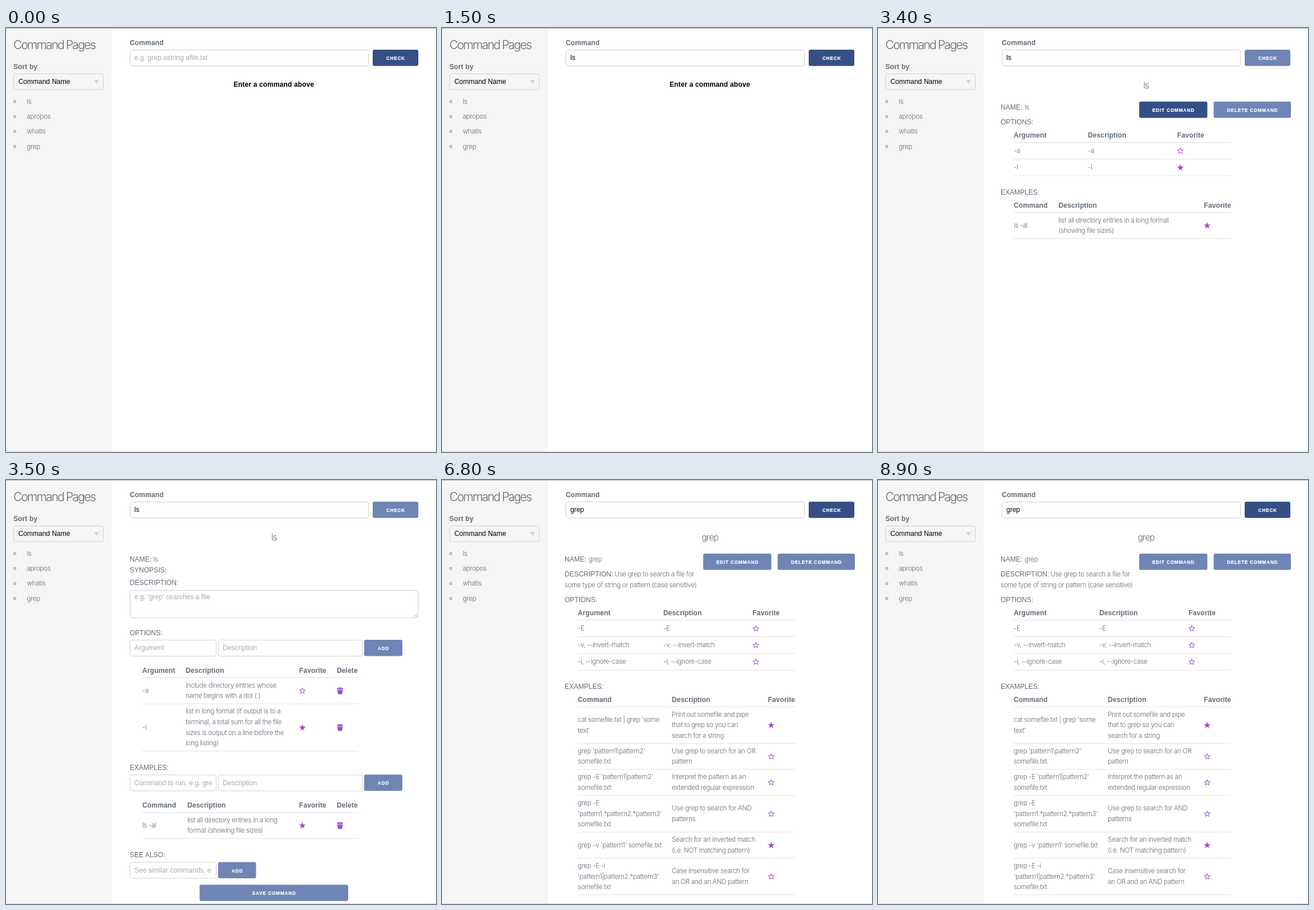
An HTML page for the animation above (9000 ms loop, 754 by 743 pixels).

```html
<!DOCTYPE html>
<html>
<head>
<meta charset="utf-8">
<style>
  html, body { margin: 0; width: 100%; height: 100%; overflow: hidden; background: #fff; }
  svg { display: block; }
  text { font: 12px "Liberation Sans", Arial, sans-serif; fill: #606c76; white-space: pre; }
  .bold { font-weight: 700; letter-spacing: .12px; }
  .light { font: 300 11.6px Inter, sans-serif; letter-spacing: -.34px; }
  .title { font: 300 21px Inter, sans-serif; letter-spacing: -1.85px; }
  .heading { font: 300 15.5px Inter, sans-serif; letter-spacing: -.95px; text-anchor: middle; }
  .hint { fill: #a9a9a9; }
  .black { fill: #000; }
  .label { font-size: 8.25px; font-weight: 700; letter-spacing: .75px; fill: #fff; stroke: #fff; stroke-width: .2px; text-anchor: middle; }
  .box { fill: #fff; stroke: #d1d1d1; }
  .button { fill: #6f85b5; }
  .hover .button { fill: #344f84; }
  .rule { stroke: #e1e1e1; }
  .icon { fill: #9b4dca; }
  .open { fill: none; stroke: #9b4dca; }
  .focus { stroke: #9b4dca; }
</style>
</head>
<body>
<svg id="stage" width="754" height="743" viewBox="0 0 754 743"></svg>
<script>
const LINE = 18.65;
const text = (x, y, str, cls = '') => `<text x="${x}" y="${y}" class="${cls}">${str}</text>`;
const light = (x, y, str) => text(x, y, str, 'light');
const bold = (x, y, str) => text(x, y, str, 'bold');
const group = (id, content) => `<g id="${id}">${content}</g>`;
const rect = (x, y, w, h, cls, id = '') =>
  `<rect id="${id}" x="${x}" y="${y}" width="${w}" height="${h}" rx="3" class="${cls}"/>`;
const field = (x, y, w, hint, h = 28, baseline = 18.3) =>
  rect(x + .5, y + .5, w - 1, h, 'box') + text(x + 8, y + baseline, hint, 'hint');
const button = (id, x, y, w, label) =>
  group(id, rect(x, y, w, 28.5, 'button') + text(x + w / 2 + .4, y + 18, label, 'label'));

function star(x, y, filled, id = '') {
  const radius = filled ? 6.2 : 5.4;
  const points = Array.from({ length: 10 }, (_, i) => {
    const r = i % 2 ? radius * .4 : radius, a = i * Math.PI / 5;
    return `${(x + r * Math.sin(a)).toFixed(2)},${(y + .4 - r * Math.cos(a)).toFixed(2)}`;
  });
  return `<polygon id="${id}" points="${points.join(' ')}" class="${filled ? 'icon' : 'open'}"/>`;
}

const empty = (x, y) => star(x, y, false);
const full = (x, y) => star(x, y, true);
const toggled = (x, y) => star(x, y, false, 'unstarred') + star(x, y, true, 'starred');
const trash = (x, y) => `<g transform="translate(${x} ${y})" class="icon">
  <path d="M-4.8-1.8Q0 .4 4.8-1.8L3.7 5.4Q0 7.2-3.7 5.4Z"/>
  <ellipse cy="-3.7" rx="5.1" ry="2.2"/><path d="M-2.7-3.6H-.7M1-4.2H2.6" stroke="#fff"/></g>`;

// Columns: [x, heading]. Cells: lines of text, or a drawing function (x, y).
function table(left, right, y, columns, rows) {
  const rule = at => `<path d="M${left} ${at}H${right}" class="rule"/>`;
  let out = rule(y) + columns.map(([x, name]) => bold(x, y - 8.4, name)).join('');
  for (const row of rows) {
    const cells = row.map(c => typeof c === 'string' ? c.split('\n') : c);
    const count = Math.max(...cells.map(c => Array.isArray(c) ? c.length : 1));
    const height = count === 1 ? 29.2 : count * LINE + 8.3;
    const mid = y + height / 2;
    cells.forEach((c, i) => {
      const x = columns[i][0];
      out += Array.isArray(c)
        ? c.map((s, k) => light(x, mid + 3.8 + (k - (c.length - 1) / 2) * LINE, s)).join('')
        : c(x + 5.7, mid);
    });
    y += height;
    out += rule(y);
  }
  return out;
}

const sidebar = `<rect width="185.5" height="743" fill="#f5f5f5"/>`
  + text(13, 37, 'Command Pages', 'title') + bold(13, 72, 'Sort by')
  + `<rect x="13.5" y="80.5" width="157" height="27.5" rx="3" fill="none" stroke="#d1d1d1"/>`
  + text(21.7, 98, 'Command Name', 'black') + '<path d="M154.5 91.5h8.5l-4.25 6z" fill="#d1d1d1"/>'
  + ['ls', 'apropos', 'whatis', 'grep'].map((name, i) =>
      `<circle cx="15.4" cy="${129 + i * 26.2}" r="2" fill="none" stroke="#606c76" stroke-width=".9"/>`
      + light(36.5, 133 + i * 26.2, name)).join('');

const search = bold(217, 30, 'Command') + rect(217.5, 38.5, 418, 28, 'box', 'field')
  + '<rect id="selection" x="225" y="45" width="9.5" height="14" fill="#b4d5fe"/>'
  + '<text id="query" x="225" y="56.3"/></text>'
  + '<rect id="caret" y="46" width="1" height="13"/>'
  + button('check', 643, 38, 80, 'CHECK');

const actions = id => button(id, 458, 129, 119.5, 'EDIT COMMAND')
  + button('', 588.5, 129, 135.5, 'DELETE COMMAND');

const listing = text(470, 105.5, 'ls', 'heading') + text(215, 143, 'NAME:') + light(257, 143, 'ls')
  + actions('edit') + text(215, 168.7, 'OPTIONS:')
  + table(238, 619, 200.5, [[238, 'Argument'], [368, 'Description'], [524.5, 'Favorite']],
      [['-a', '-a', empty], ['-l', '-l', toggled]])
  + text(215, 291.5, 'EXAMPLES:')
  + table(238, 619, 323.3, [[238, 'Command'], [316.5, 'Description'], [571.5, 'Favorite']],
      [['ls -al', 'list all directory entries in a long format\n(showing file sizes)', full]]);

const formInputs = (y, hint) => field(217, y, 152, hint) + field(372, y, 253, 'Description')
  + button('', 628, y, 67, 'ADD');

const form = text(470, 105.5, 'ls', 'heading') + text(217, 143, 'NAME:') + light(258.5, 143, 'ls')
  + text(217, 161.5, 'SYNOPSIS:') + text(217, 184, 'DESCRIPTION:')
  + field(217, 193, 506, "e.g. 'grep' searches a file", 48, 15.7)
  + '<path d="M715.5 240l6-6m-2.5 6l2.5-2.5" stroke="#888" stroke-width=".8"/>'
  + text(217, 271.5, 'OPTIONS:') + formInputs(280, 'Argument')
  + table(239, 618, 346.5, [[239, 'Argument'], [315, 'Description'], [514, 'Favorite'], [580, 'Delete']], [
      ['-a', 'include directory entries whose\nname begins with a dot (.)', empty, trash],
      ['-l', 'list in long format (if output is to a\nterminal, a total sum for all the file\nsizes is output on a line before the\nlong listing)', full, trash]])
  + text(217, 507.7, 'EXAMPLES:') + formInputs(516.3, 'Command to run, e.g. gre')
  + table(239, 618, 582.5, [[239, 'Command'], [318, 'Description'], [514, 'Favorite'], [580, 'Delete']],
      [['ls -al', 'list all directory entries in a long\nformat (showing file sizes)', full, trash]])
  + text(217, 660.7, 'SEE ALSO:') + field(217, 669.5, 152, 'See similar commands, e')
  + button('', 372, 669.5, 66.5, 'ADD') + button('', 339.5, 709.3, 260.5, 'SAVE COMMAND');

const manual = text(470, 105.5, 'grep', 'heading') + text(215, 143, 'NAME:') + light(257, 143, 'grep')
  + actions('') + text(215, 168.7, 'DESCRIPTION:')
  + light(302.5, 168.7, 'Use grep to search a file for')
  + light(215, 187.5, 'some type of string or pattern (case sensitive)')
  + text(215, 213.7, 'OPTIONS:')
  + table(238, 619, 245.5, [[238, 'Argument'], [388, 'Description'], [544.5, 'Favorite']],
      ['-E', '-v, --invert-match', '-i, --ignore-case'].map(s => [s, s, empty]))
  + text(215, 365.5, 'EXAMPLES:')
  + table(238, 619, 397.3, [[238, 'Command'], [403, 'Description'], [571.5, 'Favorite']], [
      ["cat somefile.txt | grep 'some\ntext'", 'Print out somefile and pipe\nthat to grep so you can\nsearch for a string', full],
      ["grep 'pattern1\\pattern2'\nsomefile.txt", 'Use grep to search for an OR\npattern', empty],
      ["grep -E 'pattern1|pattern2'\nsomefile.txt", 'Interpret the pattern as an\nextended regular expression', empty],
      ["grep -E\n'pattern1.*pattern2.*pattern3'\nsomefile.txt", 'Use grep to search for AND\npatterns', empty],
      ["grep -v 'pattern1' somefile.txt", 'Search for an inverted match\n(i.e. NOT matching pattern)', full],
      ["grep -E -i\n'pattern1|pattern2.*pattern3'\nsomefile.txt", 'Case insensitive search for\nan OR and an AND pattern', empty]]);

const $ = id => document.getElementById(id);
$('stage').innerHTML = sidebar + search.replace('"/></text>', '"></text>')
  + group('prompt', text(399, 103, 'Enter a command above', 'bold black'))
  + group('listing', listing) + group('form', form) + group('manual', manual)
  + '<path d="M0 .5H754" stroke="#b4b4b4"/><path d="M0 742.5H754" stroke="#d8d8d8"/>';

const show = (id, on) => $(id).style.display = on ? '' : 'none';

function render(t) {
  const within = (from, to) => t >= from && t < to;
  const typed = t < 5800
    ? 'ls'.slice(0, Math.max(0, Math.floor((t - 1000) / 100)))
    : 'grep'.slice(0, Math.floor((t - 5700) / 100));
  const query = $('query');
  query.textContent = typed || 'e.g. grep astring afile.txt';
  query.setAttribute('class', typed ? 'black' : 'hint');

  $('field').classList.toggle('focus', within(500, 1500) || within(5400, 6400));
  show('caret', within(500, 900) || within(1100, 1500) || within(5400, 5600) || within(5800, 6400));
  $('caret').setAttribute('x', 225 + (typed ? query.getComputedTextLength() : 0));
  show('selection', within(5600, 5800));

  $('check').classList.toggle('hover', !within(400, 1500) && !within(2100, 6400));
  $('edit').classList.toggle('hover', t >= 3200);
  show('unstarred', t < 2800);
  show('starred', t >= 2800);

  show('prompt', t < 1800);
  show('listing', within(1800, 3500));
  show('form', within(3500, 6700));
  show('manual', t >= 6700);
}

function frame() {
  render(performance.now() % 9000);
  requestAnimationFrame(frame);
}
frame();
</script>
</body>
</html>
```
